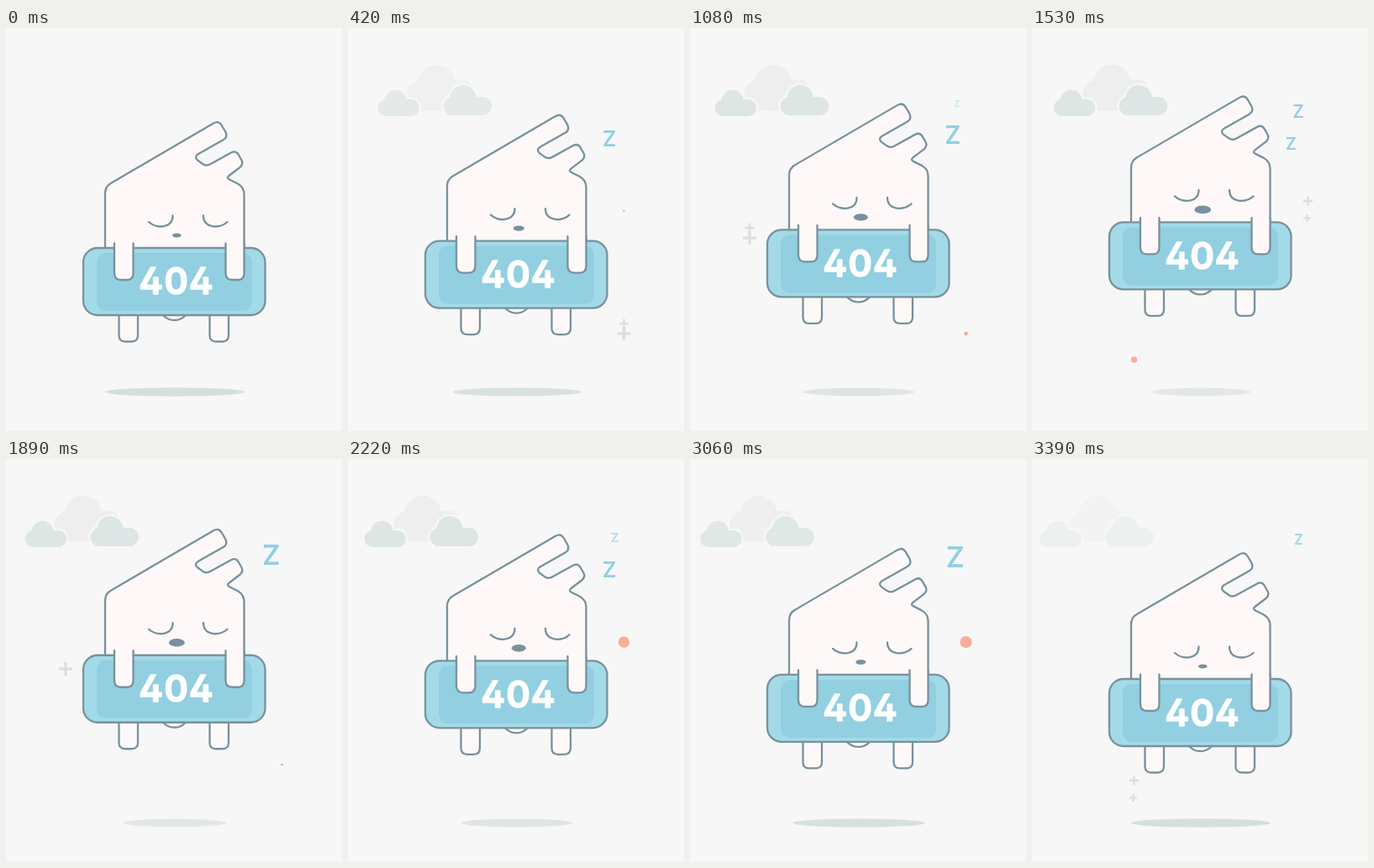
An HTML page that plays this animation: 400 px wide and 480 px high, repeating every 3.42 s.

```html
<!DOCTYPE html>
<html lang="en">
<head>
<meta charset="utf-8">
<title>404</title>
<style>
  html, body { margin: 0; width: 100%; height: 100%; overflow: hidden; background: #f7f7f7; }
  svg { display: block; width: 400px; height: 480px; }
  .line { fill: none; stroke: #78919d; stroke-width: 2.3; stroke-linecap: round; stroke-linejoin: round; }
  .skin { fill: #fef9f8; }
  .front { fill: #dde6e4; }
  .halo { fill: #f7f7f7; stroke: #f7f7f7; stroke-width: 5; }
  .code {
    font: 600 43.5px Inter, sans-serif; font-feature-settings: "cv02"; letter-spacing: 1px;
    fill: #fff; stroke: #fff; stroke-width: 1.6; stroke-linejoin: round; text-anchor: middle;
  }
  .snore { font: 600 20px Inter, sans-serif; fill: #92cfe1; text-anchor: middle; }
  .plus { fill: none; stroke: #d8dfdd; }
</style>
</head>
<body>
<svg viewBox="0 0 400 480">
  <defs>
    <g id="small"><rect x="15" y="85" width="49.5" height="20" rx="10"/><circle cx="36" cy="87" r="13.2"/></g>
    <g id="large"><rect x="93" y="82" width="57.5" height="22" rx="11"/><circle cx="116.5" cy="83.5" r="15.5"/></g>
  </defs>

  <g id="clouds">
    <g fill="#eee">
      <circle cx="84.5" cy="65.5" r="22"/>
      <circle cx="68" cy="80" r="18.5"/>
      <rect x="66" y="62" width="60" height="36.5" rx="8"/>
    </g>
    <use href="#small" class="halo"/><use href="#small" class="front"/>
    <use href="#large" class="halo"/><use href="#large" class="front"/>
  </g>

  <ellipse id="shadow" cx="201" cy="433.5" fill="#d7dfdd"/>

  <g id="hero">
    <g class="line">
      <path class="skin" d="M134.5 335V366Q134.5 373.5 142 373.5H149.5Q157 373.5 157 366V335"/>
      <path class="skin" d="M242.5 335V366Q242.5 373.5 250 373.5H257.5Q265 373.5 265 366V335"/>
      <circle class="skin" cx="200.5" cy="330" r="18"/>
      <path class="skin" d="M118 300V197Q118 188.500 125.500 184.500L247 113.500Q253 110 256.500 115.500L261.500 124Q264 130 259 133L229 150Q223.500 153.500 228 157.500L234 161.800Q238 165 243 162.300L268 148.500Q273.500 145.500 276.500 150.500L280.500 157.500Q283 162 278.500 166L266 175.500Q262 178.500 266 180.500L276 185.500Q283.500 190 283.500 198V300"/>
      <path d="M170 231Q176 236.500 184.500 236.500Q198.500 235.500 198.500 223.500M235 223.500Q235 235.500 249 236.500Q257.500 236.500 263.500 231"/>
    </g>
    <ellipse id="nose" cx="203.3" cy="247" fill="#78919d"/>
    <rect x="92" y="262" width="216.5" height="80" rx="17" fill="#a3dae8"/>
    <rect x="108" y="268" width="185" height="69" rx="11" fill="#92cfe1"/>
    <rect class="line" x="92" y="262" width="216.500" height="80" rx="17"/>
    <g class="line">
      <path class="skin" d="M129 256.500V292Q129 300 137 300H144Q151.500 300 151.500 292V256.500"/>
      <path class="skin" d="M261.500 256.500V292Q261.500 300 269.500 300H276Q283.500 300 283.500 292V256.500"/>
    </g>
    <text class="code" x="203" y="317.500">404</text>
  </g>

  <g id="sparks"></g>
  <g id="snores"></g>
</svg>

<script>
const LOOP = 3420;
const $ = id => document.getElementById(id);

function make(parent, tag, attrs) {
  const el = document.createElementNS('http://www.w3.org/2000/svg', tag);
  set(el, attrs);
  parent.append(el);
  return el;
}

function set(el, attrs) {
  for (const key in attrs) el.setAttribute(key, attrs[key]);
}

// Linear interpolation over [position, value] pairs.
function lerp(points, at) {
  let [x0, y0] = points[0];
  if (at <= x0) return y0;
  for (const [x1, y1] of points) {
    if (at < x1) return y0 + (y1 - y0) * (at - x0) / (x1 - x0);
    [x0, y0] = [x1, y1];
  }
  return y0;
}

const LIFT = [[0, 0], [1650, 1], [3320, 0]];
const CLOUD_ALPHA = [[0, 0.05], [420, 0.75], [600, 1], [2950, 1], [3390, 0.42], [3420, 0.05]];

// Snore path, by height on the stage.
const SNORE_X = [[90, 318], [99, 317], [118, 315.5], [128.5, 312.6], [138, 308], [156, 299]];
const SNORE_SIZE = [[80, 0], [90, 8], [99, 15], [109, 22], [118, 25], [128.5, 21], [138, 14], [156, 0]];
const SNORE_ALPHA = [[84, 0], [90, 0.5], [98, 1], [138, 1], [150, 0]];
const snores = Array.from({ length: 5 }, (_, i) => {
  const el = make($('snores'), 'text', { class: 'snore' });
  el.textContent = 'Z';
  return { el, start: 37 + i * 600 };
});

const BURST = 830;
const spots = [[71, 250, 20], [328.5, 364, 190], [328.5, 218, 390], [121.5, 395, 605]];

function plus(parent, x, y, size, width) {
  const h = size / 2;
  return make(parent, 'path', {
    class: 'plus', 'stroke-width': width,
    d: `M${x - h} ${y}h${size}M${x} ${y - h}v${size}`
  });
}

const sparks = spots.map(([x, y, start]) => {
  const g = make($('sparks'), 'g', { transform: `translate(${x} ${y})` });
  return {
    start,
    dot: make(g, 'circle', { fill: '#f8ae98' }),
    // Each plus with the span of time it shows for.
    parts: [
      [plus(g, 0, 0, 16, 3.2), 205, 280],
      [plus(g, 0, -12, 11, 2.4), 225, 370],
      [plus(g, -1, 8.5, 9, 2.2), 280, 370]
    ]
  };
});

function show(el, on) {
  el.setAttribute('visibility', on ? 'visible' : 'hidden');
}

function draw(t) {
  const lift = lerp(LIFT, t);
  set($('hero'), { transform: `translate(0 ${-33 * lift})` });
  set($('nose'), { rx: 5.3 + 4.9 * lift, ry: 2.5 + 2.6 * lift });
  set($('shadow'), { rx: 83 - 25.5 * lift, ry: 5.2 - 0.5 * lift, opacity: 1 - 0.4 * lift });
  set($('clouds'), { transform: `translate(${24.3 - 0.0089 * t} 0)`, opacity: lerp(CLOUD_ALPHA, t) });

  for (const { el, start } of snores) {
    const y = 156 - 0.0635 * (t - start);
    const size = lerp(SNORE_SIZE, y);
    const on = y < 156 && y > 84;
    show(el, on);
    if (on) set(el, {
      transform: `translate(${lerp(SNORE_X, y)} ${y + size / 2}) scale(${size / 14.5})`,
      opacity: lerp(SNORE_ALPHA, y)
    });
  }

  for (const { start, dot, parts } of sparks) {
    const cycle = Math.floor((t - start) / BURST);
    const age = cycle >= 0 && cycle < 4 ? t - start - cycle * BURST : -1;
    show(dot, age >= 0 && age < 205);
    set(dot, { r: Math.min(7.2, Math.max(0, age) * 0.039) });
    for (const [el, from, to] of parts) show(el, age >= from && age < to);
  }
}

const began = performance.now();
function tick() {
  draw((performance.now() - began) % LOOP);
  requestAnimationFrame(tick);
}
draw(0);
requestAnimationFrame(tick);
</script>
</body>
</html>
```
